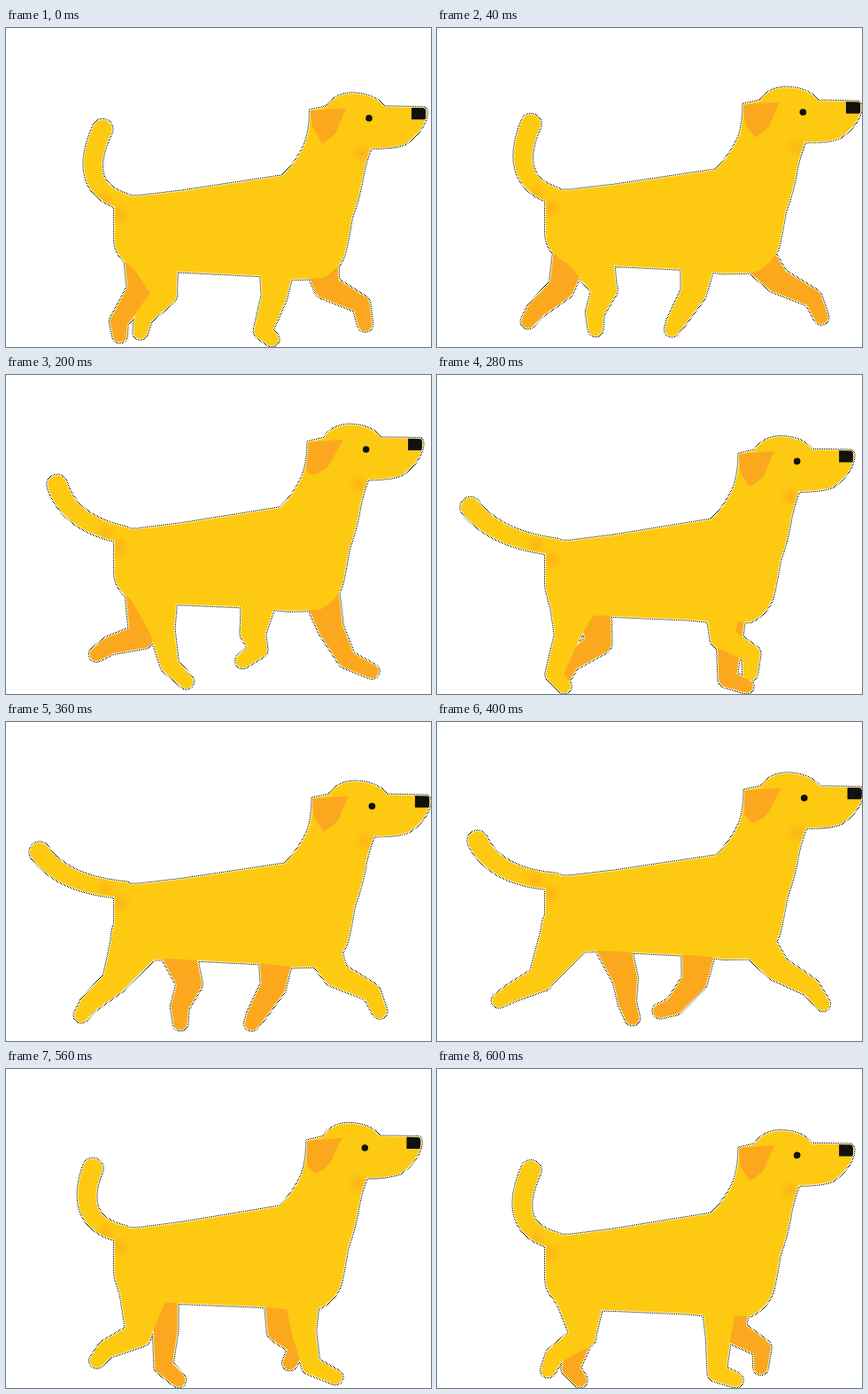
Animation of 480x360 px, one loop 640 ms. Source, as an HTML page with a canvas:

```html
<!DOCTYPE html>
<html lang="en">
<head>
<meta charset="utf-8">
<title>Walking dog</title>
<style>
html, body { margin: 0; width: 100%; height: 100%; overflow: hidden; background: #fff; }
canvas { display: block; }
</style>
</head>
<body>
<canvas id="stage" width="480" height="360"></canvas>
<script>
const ctx = document.getElementById('stage').getContext('2d');
const STEPS = 16, STEP_MS = 40, HALF = STEPS / 2, GROUND = 351;
const COLORS = { near: '#fec911', far: '#fba81f', rim: '#fff0a0', dark: '#111' };

const mix = (a, b, t) => a + (b - a) * t;
const turn = (i, times = 1) => Math.cos(i * times * 2 * Math.PI / STEPS);

// One swing per loop, peaking at step `peak`, plus a swing at double speed
const wave = (i, mean, amp, peak, amp2 = 0, peak2 = -.8) =>
  mean + amp * turn(i - peak) + amp2 * turn(i - peak2, 2);

// The body bounces and leans twice per loop
const bob = i => -13 + 10 * turn(i + .4, 2) + 1.7 * turn(i, 4);
const sway = i => 5 * turn(i - 2, 2);
const nod = i => Math.min(0, .6 * sway(i));
const earDrop = i => (1 - turn(i, 2)) / 2;

// Knee, ankle and toe of a near leg
const hindLeg = i => [
  [wave(i, 156, 39, 2.4), wave(i, 293, 3, -2, 6)],
  [wave(i, 139, 60, 3, 7, 3.6), wave(i, 318, 11, 4.7, 13)],
  [wave(i, 138, 76, 3.3, 7, 4.3), wave(i, 333, 16, 4.3, 15)]
];
const frontLeg = i => [
  [wave(i, 324, 56, 10.9, 8, 1.6), wave(i, 290, 7, 1.8, 9)],
  [wave(i, 335, 84, 10.4, 6, .9), wave(i, 317, 15, 0, 12)],
  [wave(i, 339, 103, 10.8, 8, -.2), wave(i, 331, 9, -.8, 15)]
];

// Far legs run half a stride later, a little to the right.
// The hip follows the knee by `pull`, kept between `min` and `max`.
const hindHip = { x: 160, y: 251, min: 150, max: 205 };
const frontHip = { x: 325, y: 258, min: 270, max: 354, pull: .8, r: 21 };
const legs = [
  { pose: hindLeg, hip: { ...hindHip, pull: .6, r: 22, min: 155 }, far: true, shift: 18 },
  { pose: frontLeg, hip: frontHip, far: true, shift: 12 },
  { pose: hindLeg, hip: { ...hindHip, pull: .25, r: 31 }, shift: 0 },
  { pose: frontLeg, hip: frontHip, shift: 0 }
];

const torso = new Path2D(`M123 205 Q122 195 130 192 L150 192 L200 186 L312 169
  Q328 155 338 133 Q344 118 344 95 L362 91 Q372 76 392 76 Q416 77 427 91
  L472 92 Q476 94 474 103 Q469 120 451 132 Q440 137 412 137 Q407 148 403 166
  Q399 192 390 216 Q386 240 383 253 Q378 274 357 284 L322 285 L288 281
  L190 276 L150 276 Q123 262 123 240 Z`);

// Chain of round joints [x, y, radius] with tapered links
function chain(joints) {
  const path = new Path2D();
  joints.forEach(([x, y, r], i) => {
    path.moveTo(x + r, y);
    path.arc(x, y, r, 0, Math.PI * 2);
    if (!i) return;
    const [px, py, pr] = joints[i - 1];
    const len = Math.hypot(x - px, y - py) || 1;
    const nx = (y - py) / len, ny = (px - x) / len;
    path.moveTo(px + nx * pr, py + ny * pr);
    path.lineTo(x + nx * r, y + ny * r);
    path.lineTo(x - nx * r, y - ny * r);
    path.lineTo(px - nx * pr, py - ny * pr);
    path.closePath();
  });
  return path;
}

function legPath({ pose, hip, far, shift }, i) {
  const radii = [13.5, 9.5, 7.5];
  const joints = pose(far ? i + HALF : i).map(([x, y], n) =>
    [x + shift, Math.min(y, GROUND), radii[n]]);
  const x = hip.x + hip.pull * (joints[0][0] - hip.x);
  const hipX = Math.max(hip.min, Math.min(hip.max, x));
  return chain([[hipX, hip.y + bob(i), hip.r], ...joints]);
}

function tailPath(i) {
  const base = [134, 198];
  const bend = [wave(i, 72, 7, 1), wave(i, 187, -6, 1.5)];
  const tip = [wave(i, 72, 37, 0), wave(i, 136, -20, .3)];
  const joints = [];
  for (let t = 0; t <= 1; t += 1 / 16) {
    const [x, y] = base.map((b, n) =>
      mix(mix(b, bend[n], t), mix(bend[n], tip[n], t), t));
    joints.push([x, y + bob(i), mix(8.5, 10.5, t)]);
  }
  return chain(joints);
}

function dottedInk() {
  const tile = document.createElement('canvas');
  tile.width = tile.height = 2;
  const pen = tile.getContext('2d');
  pen.fillRect(0, 0, 1, 1);
  pen.fillRect(1, 1, 1, 1);
  return ctx.createPattern(tile, 'repeat');
}
const ink = dottedInk();

function outline(path, style, width) {
  ctx.strokeStyle = style;
  ctx.lineWidth = width;
  ctx.stroke(path);
}

function shade(x, y, r) {
  const glow = ctx.createRadialGradient(x, y, 0, x, y, r);
  glow.addColorStop(0, 'rgba(250,165,25,.55)');
  glow.addColorStop(1, 'rgba(250,165,25,0)');
  ctx.fillStyle = glow;
  ctx.fillRect(x - r, y - r, 2 * r, 2 * r);
}

function face(drop) {
  ctx.fillStyle = COLORS.far;
  ctx.beginPath();
  ctx.moveTo(343, 95);
  ctx.lineTo(384, 92);
  ctx.lineTo(mix(372, 369, drop), mix(121, 118, drop));
  ctx.quadraticCurveTo(364, 128, mix(357, 347, drop), 132);
  ctx.lineTo(mix(346, 341, drop), mix(113, 131, drop));
  ctx.fill();
  ctx.fillStyle = COLORS.dark;
  ctx.fillRect(458, 91, 16, 14);
  ctx.beginPath();
  ctx.arc(410, 103.5, 3.8, 0, Math.PI * 2);
  ctx.fill();
}

function draw(i) {
  const dx = sway(i) / 300, dy = bob(i), tilt = nod(i) / 300;
  const lean = new DOMMatrix([1 + dx, tilt, 0, 1, -125 * dx, dy - 125 * tilt]);
  const near = new Path2D(), far = new Path2D(), all = new Path2D();
  near.addPath(torso, lean);
  near.addPath(tailPath(i));
  for (const leg of legs) (leg.far ? far : near).addPath(legPath(leg, i));
  all.addPath(far);
  all.addPath(near);

  ctx.fillStyle = '#fff';
  ctx.fillRect(0, 0, 480, 360);
  ctx.lineJoin = 'round';
  outline(all, ink, 4);
  outline(all, COLORS.rim, 2);
  ctx.fillStyle = COLORS.far;
  ctx.fill(far);
  ctx.fillStyle = COLORS.near;
  ctx.fill(near);

  ctx.save();
  ctx.clip(near);
  ctx.transform(lean.a, lean.b, lean.c, lean.d, lean.e, lean.f);
  shade(402, 143, 13);
  shade(128, 212, 14);
  shade(112, 196, 12);
  face(earDrop(i));
  ctx.restore();
}

function tick() {
  draw(Math.floor(performance.now() / STEP_MS) % STEPS);
  requestAnimationFrame(tick);
}
tick();
</script>
</body>
</html>
```
